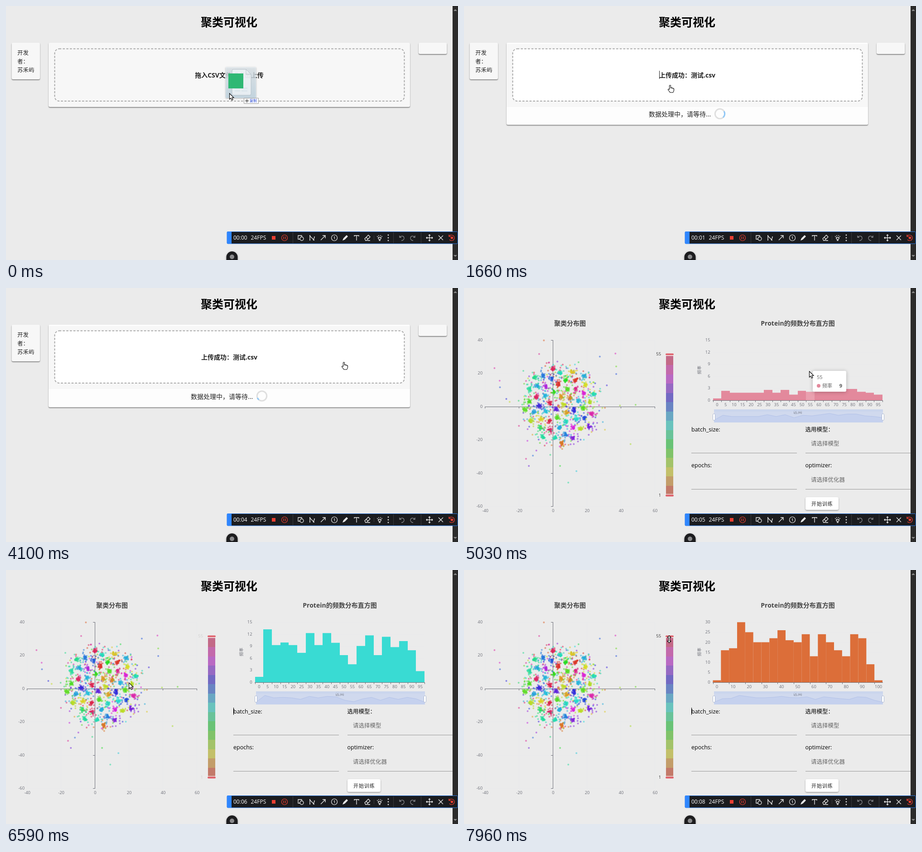
These frames come from a looping animation (998x561 px, 8 s). An HTML page with a canvas:

```html
<!DOCTYPE html>
<html lang="zh">
<head>
<meta charset="utf-8">
<title>聚类可视化</title>
<style>
html, body { margin: 0; width: 100%; height: 100%; overflow: hidden; background: #ebebeb; }
canvas { display: block; }
</style>
</head>
<body>
<canvas id="stage" width="998" height="561"></canvas>
<script>
const LOOP = 8000, DROPPED = 1070, UPLOADED = 1420, CHARTS = 4630;
const FONT = '"Open Sans", "Noto Sans CJK SC", "Noto Sans CJK", sans-serif';
const GREY = '#6e7079';
let ctx = document.getElementById('stage').getContext('2d');

// ---------- helpers ----------
const clamp = v => Math.max(0, Math.min(1, v));
const ramp = (t, start, span) => clamp((t - start) / span);
const mix = (a, b, p) => a + (b - a) * p;
const smooth = p => p * p * (3 - 2 * p);
const cubicOut = p => 1 - (1 - p) ** 3;
const cubicInOut = p => p < .5 ? 4 * p ** 3 : 1 - 4 * (1 - p) ** 3;

function text(str, x, y, size, color = '#000', align = 'left', weight = 400) {
  ctx.font = `${weight} ${size}px ${FONT}`;
  ctx.fillStyle = color;
  ctx.textAlign = align;
  ctx.fillText(str, x, y + size * .37);
}
function rect(x, y, w, h, color) {
  ctx.fillStyle = color;
  ctx.fillRect(x, y, w, h);
}
function paint(fill, stroke, width) {
  if (fill) { ctx.fillStyle = fill; ctx.fill(); }
  if (stroke) { ctx.strokeStyle = stroke; ctx.lineWidth = width; ctx.stroke(); }
}
function round(x, y, w, h, r, fill, stroke, width = 1) {
  ctx.beginPath();
  ctx.roundRect(x, y, w, h, r);
  paint(fill, stroke, width);
}
function circle(x, y, r, fill, stroke, width = 1) {
  ctx.beginPath();
  ctx.arc(x, y, r, 0, 7);
  paint(fill, stroke, width);
}
function path(d, x, y, fill, stroke, width = 1) {
  ctx.save();
  ctx.translate(x, y);
  const shape = new Path2D(d);
  if (fill) { ctx.fillStyle = fill; ctx.fill(shape); }
  if (stroke) { ctx.strokeStyle = stroke; ctx.lineWidth = width; ctx.stroke(shape); }
  ctx.restore();
}
function faded(alpha, draw) {
  ctx.save();
  ctx.globalAlpha = alpha;
  draw();
  ctx.restore();
}
function raised(draw, alpha = .4, blur = 2, dy = 1.5) {
  ctx.save();
  ctx.shadowColor = `rgba(0,0,0,${alpha})`;
  ctx.shadowBlur = blur;
  ctx.shadowOffsetY = dy;
  draw();
  ctx.restore();
}
const card = (x, y, w, h, color = '#f7f7f7') => raised(() => round(x, y, w, h, 3, color), .5);

// ---------- scatter plot, its points drawn once ----------
function drawPoints() {
  let seed = 7;
  const random = () => (seed = seed * 16807 % 2147483647) / 2147483647;
  const normal = () => random() + random() + random() + random() - 2;
  const around = (angle, r) => [213 + .95 * r * Math.cos(angle), 258 + r * Math.sin(angle)];
  const dot = ([x, y], hue) => circle(x, y, 2, `hsla(${hue},72%,50%,.5)`);
  const cloud = ([x, y], hue, count, spread) => {
    for (let i = 0; i < count; i++) dot([x + normal() * spread, y + normal() * spread], hue);
  };
  for (let i = 0; i < 36; i++) dot(around(random() * 6.283, 90 + 95 * random() ** 1.4), random() * 350);
  for (let i = 0; i < 160; i++) dot(around(random() * 6.283, 98 * Math.sqrt(random())), random() * 350);
  // Cluster centres follow a sunflower spiral
  for (let i = 0; i < 55; i++) {
    const centre = around(i * 2.39996, 86 * Math.sqrt((i + .5) / 55));
    const hue = random() * 350;
    cloud(centre, hue, 9, 16);
    cloud(centre, hue, 26, 4);
  }
}
const points = document.createElement('canvas');
points.width = 480;
points.height = 500;
const screen = ctx;
ctx = points.getContext('2d');
drawPoints();
ctx = screen;

function scatter(t) {
  text('聚类分布图', 234, 78, 14, '#464646', 'center', 700);
  const ticks = Array.from({ length: 6 }, (_, i) => [Math.round(46 + i * 75), Math.round(115 + i * 73.4)]);
  for (const [x, y] of ticks) {
    rect(x, 115, 1, 367, '#e8e9ec');
    rect(46, y, 375, 1, '#e8e9ec');
  }
  rect(46, 262, 376, 1, GREY);
  rect(196, 115, 1, 368, GREY);
  ticks.forEach(([x, y], i) => {
    rect(x, 262, 1, 4, GREY);
    rect(192, y, 4, 1, GREY);
    text(i * 20 - 40, x + 1, 492, 9.4, GREY, 'center');
    text(40 - i * 20, 41, y, 9.4, GREY, 'right');
  });
  faded(ramp(t, CHARTS, 250), () => ctx.drawImage(points, 0, 0));
}

// ---------- colour scale ----------
function colourScale(t) {
  const bands = 15, height = 307 / bands;
  for (let i = 0; i < bands; i++) {
    const y = Math.round(150 + i * height);
    rect(446, y, 16, Math.round(150 + (i + 1) * height) - y, `hsl(${340 - 23.5 * i},43%,59%)`);
  }
  for (const y of [144.5, 456.5]) round(445, y, 18, 4, 2, '#e0656f');
  for (const y of [149, 455]) rect(446, y, 16, 1, '#fff');

  const alpha = 1 - .35 * ramp(t, 5420, 80) - .57 * ramp(t, 6350, 270) + .92 * ramp(t, 7560, 140);
  faded(alpha, () => {
    text('55', 435, 146, 9.4, '#333', 'right');
    text('1', 435, 458, 9.4, '#333', 'right');
  });
  if (t > 5420 && t < 5720) {
    circle(453.5, 239, 4, '#6068c8', '#fff', 2);
    text('≈ 42', 441, 239, 9.4, '#333', 'right');
  }
}

// ---------- histogram ----------
const HISTOGRAMS = [
  { start: 4971, span: 700, ease: cubicOut, color: '#e3899c', max: 15, tick: 3, every: 1,
    data: [2, 10, 8, 8, 8, 8, 11, 8, 11, 6, 10, 9, 11, 13, 10, 12, 12, 9, 8, 6] },
  { start: 6425, span: 300, ease: cubicInOut, color: '#39dbd3', max: 15, tick: 3, every: 1,
    data: [1, 15, 10, 11, 10, 7, 13, 10, 13, 12, 5, 2, 8, 11, 5, 11, 7, 11, 8, 1] },
  { start: 7260, span: 300, ease: cubicInOut, color: '#dc6e39', max: 30, tick: 5, every: 2,
    data: [1, 16, 17, 30, 25, 20, 20, 22, 26, 21, 20, 24, 13, 24, 20, 16, 13, 24, 22, 9, 1] }];
const LEFT = 549.5, WIDTH = 374.5, BASE = 248, HEIGHT = 132.7;

function histogram(t) {
  const index = Math.max(0, HISTOGRAMS.findLastIndex(h => t >= h.start));
  const { start, span, ease, color, max, tick, every, data } = HISTOGRAMS[index];
  const before = HISTOGRAMS[index - 1];
  const p = ease(ramp(t, start, span));
  const bar = WIDTH / data.length;
  const hovered = t > 4850 && t < 5200;
  const snap = every === 1 ? Math.round : v => v;

  text('Protein的频数分布直方图', 737, 78, 14, '#464646', 'center', 700);
  for (let v = 0; v <= max; v += tick) {
    const y = Math.round(BASE - v / max * HEIGHT);
    rect(549, y, 375, 1, '#e8e9ec');
    text(v, 543.5, y - .5, 9.4, GREY, 'right');
  }
  data.forEach((value, i) => {
    const from = before ? (before.data[i] || 0) / before.max : 0;
    const h = mix(from, value / max, p) * HEIGHT;
    const x = snap(LEFT + i * bar), right = snap(LEFT + (i + 1) * bar);
    rect(x, BASE - h, right - x, h, hovered && i === 11 ? '#eaa0af' : color);
  });
  rect(549, 248, 376, 1, GREY);
  for (let i = 0; i <= data.length; i += every) {
    rect(Math.round(LEFT + i * bar), 248, 1, 4, GREY);
    if (i < data.length) text(i * 5, LEFT + (i + .5) * bar, 258, 9.4, GREY, 'center');
  }
  ctx.save();
  ctx.translate(520, 181);
  ctx.rotate(-Math.PI / 2);
  text('频率', 0, 0, 9.4, GREY, 'center');
  ctx.restore();
  slider(data);
}

function slider(data) {
  rect(552, 268, 373, 29, '#d0d9ee');
  text('区间', 737, 274, 9.4, '#777b88', 'center');
  rect(552, 268, 373, 5, 'rgba(203,214,238,.85)');
  const low = Math.min(...data), high = Math.max(...data);
  const line = data.map((v, i) =>
    `${552 + 373 * i / (data.length - 1)} ${292 - 15 * (v - low) / (high - low)}`).join('L');
  path(`M552 297L${line}L925 297Z`, 0, 0, '#c5d1ee');
  path(`M${line}`, 0, 0, null, '#adbde6', .8);
  for (const x of [549.5, 922.5]) round(x, 278, 5, 14, 1.5, '#fff', '#acb8d1');
}

function tooltip(t, mouseX, mouseY) {
  const x = mouseX + 8, y = mouseY - 1;
  faded(ramp(t, 4850, 100) * (1 - ramp(t, 5180, 120)), () => {
    raised(() => round(x, y, 74, 46, 3, '#fff'), .25, 8, 1);
    text('55', x + 9, y + 14, 11, '#666');
    circle(x + 13, y + 33, 4, '#e3899c');
    text('频率', x + 21, y + 33, 11, '#666');
    text('9', x + 65, y + 33, 11, '#555', 'right', 700);
  });
}

// ---------- pages ----------
const caretOn = t => (t + 960) % 1060 < 530;

function uploadPage(t) {
  const done = t >= UPLOADED;
  card(12.5, 81, 62.5, 81);
  ['开发', '者：', '苏禾屿'].forEach((line, i) => text(line, 25, 103.5 + i * 18.7, 12.5, '#222'));
  card(911, 81, 62.5, 25);
  const sink = smooth(ramp(t, 1600, 300));
  card(94, 81, 798, done ? 181.5 + sink : 142, done ? '#fdfdfd' : '#f7f7f7');
  if (done) rect(94, 84, 798, 139, '#f7f7f7');

  const white = Math.round(mix(247, 255, ramp(t, 150, 250)));
  ctx.setLineDash([4.7, 3.1]);
  round(107.5, 94.5, 772, 115.5, 10, `rgb(${white},${white},${white})`, '#aaa', 2);
  ctx.setLineDash([]);
  text(done ? '上传成功：测试.csv' : '拖入CSV文件或点击上传', 493, 153, 14, '#222', 'center', 700);
  if (!done) return;
  if (caretOn(t) && t < 4400) rect(431, 143, 1, 18, '#222');
  text('数据处理中，请等待...', 408, 239 + sink, 14, '#222');
  spinner(565, 238 + sink / 2, Math.min(t, 4380) - UPLOADED);
}

function spinner(x, y, elapsed) {
  const p = elapsed / 1400 % 1, unit = Math.PI * 2 / 125.6;
  const grow = smooth(clamp(p * 2)), shift = smooth(clamp(p * 2 - 1));
  const offset = 15 * grow + 109 * shift;
  const length = Math.min(1 + 99 * grow, 125.6 - offset);
  const start = Math.PI * (p * 1.5 - .5) + offset * unit;
  circle(x, y, 10.7, null, '#dfdfdf', 3);
  ctx.beginPath();
  ctx.arc(x, y, 10.7, start, start + length * unit);
  paint(null, '#8fc8f8', 3);
}

function chartPage(t) {
  scatter(t);
  colourScale(t);
  histogram(t);
  text('batch_size:', 502, 312, 12.5);
  text('选用模型：', 753.5, 312, 12.5);
  text('epochs:', 502, 391.5, 12.5);
  text('optimizer:', 753.5, 391.5, 12.5);
  text('请选择模型', 766, 343.5, 12.5, '#666');
  text('请选择优化器', 766, 423, 12.5, '#666');
  for (const y of [364, 444]) {
    rect(502, y, 233, 1, '#989898');
    rect(754, y, 232, 1, '#989898');
  }
  raised(() => round(754, 462, 73, 28, 3, '#fff'), .35, 3);
  ctx.letterSpacing = '0.9px';
  text('开始训练', 767, 476.5, 11, '#222');
  ctx.letterSpacing = '0px';
  if (t > 6400 && caretOn(t)) rect(502, 304, 1, 16, '#000');
}

// ---------- window chrome ----------
function toolbar(t) {
  const seconds = Math.max(0, Math.floor((t - 70) / 950));
  round(488, 498.5, 509.5, 26.5, 2, '#1b1c1f', '#2c7be5');
  round(488, 498, 10, 27, [2, 0, 0, 2], '#2f86ff');
  text('00:0' + seconds, 502, 512, 12, '#fff');
  text('24FPS', 540.5, 512, 12, '#fff');
  rect(587, 508, 8, 8, '#ea3f32');
  circle(615, 512, 6.5, null, '#ea3f32', 1.2);
  for (const x of [612.5, 616.2]) rect(x, 509, 1.3, 6, '#ea3f32');
  for (const x of [633, 855, 916]) rect(x, 500, 1, 24, '#3a3b3e');
  rect(812, 507, 1, 10, '#3a3b3e');

  const icon = (d, x, color = '#eee') => path(d, x, 512, null, color, 1.3);
  icon('M-1 3H-6V-5H2V-3M6 2A4 4 0 1 1-2 2A4 4 0 1 1 6 2', 651);
  icon('M-5 5V-4L0 1L3 4L5-1M-6 5h2M-6-5h2M2 5h3M4-2h2', 676);
  icon('M-5 5L5-5M-1-5H5V1', 700);
  circle(725, 512, 6.5, null, '#eee', 1.2);
  text('1', 725, 512, 9, '#eee', 'center', 600);
  path('M-6 6L-4 1L3-6L6-3L-1 4Z', 749, 512, '#eee');
  icon('M-5-3V-5H5V-3M0-5V6', 774);
  icon('M-6 2L2-6L6-2L-2 6H-4ZM-3-1L2 3M0 6H6', 798);
  icon('M-3-1H3V2L1 3V6H-1V3L-3 2ZM-5-2L-5-4M5-2V-4M-2-4V-6M2-4V-6', 825);
  for (const y of [506, 512, 518]) circle(844, y, 1.4, '#ddd');
  icon('M-5-5V-1H-1M-5-1C-1-6 5-4 5 1C5 4 2 6-1 6', 874, '#85868a');
  icon('M5-5V-1H1M5-1C1-6-5-4-5 1C-5 4-2 6 1 6', 898, '#85868a');
  icon('M-7 0H7M0-7V7M-5-2L-7 0L-5 2M5-2L7 0L5 2M-2-5L0-7L2-5M-2 5L0 7L2 5', 935);
  icon('M-5-5L5 5M5-5L-5 5', 960);
  icon('M-6-4C-2-8 6-6 6 0S-1 8-5 4M-6-7V-3H-2', 984, '#ea3f32');
  circle(984.5, 512, 2.8, '#ea3f32');
}

function chrome(t) {
  text('聚类可视化', 492.5, 36, 25, '#000', 'center', 700);
  rect(986, 0, 12, 561, '#2b2b2b');
  path('M-4 2L0-2L4 2Z', 992, 9, '#8c8c8c');
  path('M-4-2L0 2L4-2Z', 992, 552, '#8c8c8c');
  raised(() => round(486.5, 542, 25, 30, 12.5, '#1d1d1f'), .3, 4, 1);
  circle(499, 554, 5, '#8a8a8c');
  toolbar(t);
}

// ---------- pointer ----------
// Each move: start, end, x, y
const MOVES = [
  [40, 700, 412, 171], [UPLOADED, 1640, 455, 175], [1900, 2700, 746, 164],
  [CHARTS, 4950, 762, 184], [5160, 5450, 461, 211], [5560, 6200, 289, 239],
  [6380, 6570, 271, 249], [7260, 7720, 453, 153]];

function mouseAt(t) {
  let x = 493, y = 193;
  for (const [start, end, toX, toY] of MOVES) {
    const p = smooth(ramp(t, start, end - start));
    x = mix(x, toX, p);
    y = mix(y, toY, p);
  }
  return [x, y];
}

function draggedFile(x, y) {
  ctx.save();
  ctx.translate(x - 493, y - 193);
  faded(.75, () => {
    const tint = ctx.createLinearGradient(0, 135, 0, 204);
    tint.addColorStop(0, '#e9f1f6');
    tint.addColorStop(1, '#c9e0ee');
    raised(() => rect(485, 135, 67, 68, tint), .4, 3, 1);
    path('M499 143Q499 140 502 140H530L541 151V194Q541 197 538 197H502Q499 197 499 194Z', 0, 0, '#f2f6f9', '#a9b4bc');
    path('M530 140V151H541', 0, 0, null, '#a9b4bc');
    for (const row of [180, 186]) {
      rect(505, row, 12, 3, '#d8e3ea');
      rect(520, row, 13, 3, '#d8e3ea');
    }
  });
  rect(491, 149, 33, 33, '#2fb874');
  round(525.5, 203.5, 32, 12, 0, '#fff', '#999');
  path('M528 209.5H536M532 205.5V213.5', 0, 0, null, '#222', 1.2);
  text('复制', 538, 209.5, 8, '#1d3fd0');
  ctx.restore();
}

const ARROW = 'M.5 0V13L3.500 10.300L5.500 15L8 14L6 9.500H10Z';
const RESIZE = 'M0-8L4-4H1.500V4H4L0 8L-4 4H-1.500V-4H-4Z';
const HAND = 'M-1.500 9V1Q0-1.500 1.500 1V6Q3 4.500 4.200 6.500Q5.500 5.500 6.500 7Q8.500 6.500 8.500 9V11Q8 14 6.500 16H0Q-2 13-4.500 10Q-4.500 7.500-1.500 9Z';

function pointer(t, x, y) {
  if (t < DROPPED) draggedFile(x, y);
  const resizing = t > 5400 && t < 5680 || t > 7660;
  const shape = resizing ? RESIZE : t > DROPPED && t < CHARTS ? HAND : ARROW;
  path(shape, x, y, '#fff', '#000', 1.1);
}

function frame(now) {
  const t = now % LOOP, [x, y] = mouseAt(t);
  rect(0, 0, 998, 561, '#ebebeb');
  (t < CHARTS ? uploadPage : chartPage)(t);
  chrome(t);
  tooltip(t, x, y);
  pointer(t, x, y);
  requestAnimationFrame(frame);
}
requestAnimationFrame(frame);
</script>
</body>
</html>
```
